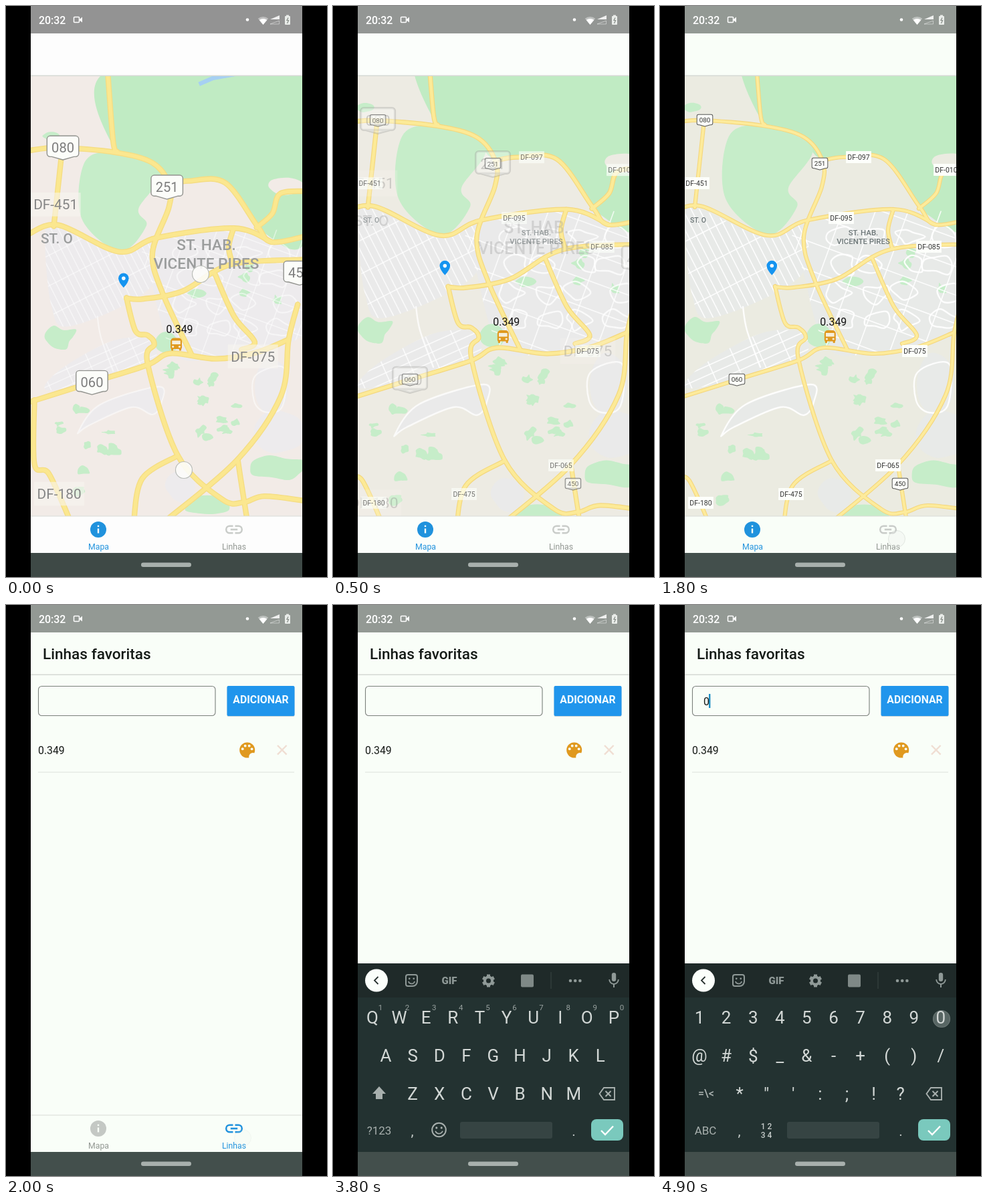
These frames come from a looping animation (480x854 px, 5000 ms). An HTML page with a canvas:

```html
<!DOCTYPE html>
<html lang="pt">
<head>
<meta charset="utf-8">
<title>Linhas</title>
<style>
html, body { margin: 0; width: 100%; height: 100%; overflow: hidden; background: #000; }
canvas { display: block; width: 480px; height: 854px; }
</style>
</head>
<body>
<canvas id="stage" width="480" height="854"></canvas>
<script>
const ctx = document.getElementById('stage').getContext('2d');
const LOOP = 5000, STEP = 100;
const FONT = 'Roboto, Arial, sans-serif';
const BLUE = '#2092dd', ORANGE = '#e0991f', PAPER = '#f9fef8', GRAY = '#a8b0ae';

const ramp = (t, a, b) => Math.min(1, Math.max(0, (t - a) / (b - a)));
const rgb = (c) => [1, 3, 5].map((i) => parseInt(c.slice(i, i + 2), 16));
function mix(a, b, k) {
  const p = rgb(a), q = rgb(b);
  return `rgb(${p.map((v, i) => Math.round(v + (q[i] - v) * k))})`;
}
let seed = 7;
function random() {
  seed = (seed * 16807) % 2147483647;
  return seed / 2147483647;
}

// Drawing helpers
function rect(x, y, w, h, color) {
  ctx.fillStyle = color;
  ctx.fillRect(x, y, w, h);
}
function paint(fill, edge, width = 1) {
  if (fill) { ctx.fillStyle = fill; ctx.fill(); }
  if (edge) { ctx.strokeStyle = edge; ctx.lineWidth = width; ctx.stroke(); }
}
function round(x, y, w, h, r, fill, edge, width) {
  ctx.beginPath();
  ctx.roundRect(x, y, w, h, r);
  paint(fill, edge, width);
}
function disc(x, y, r, fill, edge, width) {
  ctx.beginPath();
  ctx.arc(x, y, r, 0, 7);
  paint(fill, edge, width);
}
function arc(x, y, r, a, b, color, width) {
  ctx.beginPath();
  ctx.arc(x, y, r, a, b);
  paint(null, color, width);
}
function trace(pts) {
  ctx.beginPath();
  for (let i = 0; i < pts.length; i += 2) ctx.lineTo(pts[i], pts[i + 1]);
}
function line(pts, color, width) {
  trace(pts);
  paint(null, color, width);
}
function shape(pts, color) {
  trace(pts);
  paint(color);
}
function text(s, x, y, size, color, align = 'center', weight = 400) {
  ctx.font = `${weight} ${size}px ${FONT}`;
  ctx.textAlign = align;
  ctx.fillStyle = color;
  ctx.fillText(s, x, y);
}
function faded(alpha, draw) {
  if (alpha <= 0) return;
  ctx.save();
  ctx.globalAlpha *= alpha;
  draw();
  ctx.restore();
}
function touch(x, y, alpha) {
  faded(alpha, () => disc(x, y, 12.5, 'rgba(252,252,250,.9)', '#b9bcb8', 1.2));
}

// Icons
function linkIcon(x, y, color) {
  for (const side of [-1, 1]) {
    ctx.beginPath();
    ctx.moveTo(x + side * 1.5, y - 5.3);
    ctx.lineTo(x + side * 6.5, y - 5.3);
    ctx.arc(x + side * 6.5, y, 5.3, -Math.PI / 2, Math.PI / 2, side < 0);
    ctx.lineTo(x + side * 1.5, y + 5.3);
    paint(null, color, 2.5);
  }
  rect(x - 5.2, y - 1.3, 10.4, 2.6, color);
}
function pinIcon(x, tip) {
  const y = tip - 14;
  ctx.beginPath();
  ctx.arc(x, y, 7.8, Math.PI, 0);
  ctx.quadraticCurveTo(x + 7.5, y + 6, x, tip);
  ctx.quadraticCurveTo(x - 7.5, y + 6, x - 7.8, y);
  paint('#1594f0');
  disc(x, y, 2.8, '#f4fbff');
}
function busIcon(x, y) {
  round(x - 8.5, y - 9.5, 17, 16.5, [5, 5, 2, 2], ORANGE);
  rect(x - 6.3, y - 5.5, 12.6, 5.5, '#f6efdc');
  for (const side of [-1, 1]) {
    disc(x + side * 4.9, y + 3.5, 1.6, '#f6efdc');
    round(x + side * 5.9 - 1.6, y + 5, 3.2, 4.5, 1, ORANGE);
  }
}
function paletteIcon(x, y) {
  disc(x, y, 11.5, ORANGE);
  disc(x + 8.5, y + 10, 6, PAPER);
  for (const a of [-2.87, -2, -1.14, -0.27]) disc(x + 7.2 * Math.cos(a), y + 0.2 + 7.2 * Math.sin(a), 1.9, PAPER);
}
function cross(x, y, r, color, width) {
  for (const d of [-r, r]) line([x - d, y - r, x + d, y + r], color, width);
}

// Map geometry at the final zoom
function curve(pts, closed) {
  const path = new Path2D(), n = pts.length / 2;
  const at = (i) => {
    const j = closed ? (i + n) % n : Math.min(n - 1, Math.max(0, i));
    return [pts[2 * j], pts[2 * j + 1]];
  };
  path.moveTo(...at(0));
  for (let i = 0; i < (closed ? n : n - 1); i++) {
    const [a, b, c, d] = [-1, 0, 1, 2].map((k) => at(i + k));
    path.bezierCurveTo(b[0] + (c[0] - a[0]) / 6, b[1] + (c[1] - a[1]) / 6,
      c[0] - (d[0] - b[0]) / 6, c[1] - (d[1] - b[1]) / 6, ...c);
  }
  return path;
}
const road = (...pts) => curve(pts, false);
const area = (...pts) => curve(pts, true);
function blob(x, y, w, h, rough, n = 10) {
  const pts = [];
  for (let i = 0; i < n; i++) {
    const a = i / n * 2 * Math.PI, r = 1 - rough * random();
    pts.push(x + w * r * Math.cos(a), y + h * r * Math.sin(a));
  }
  return curve(pts, true);
}
function grove(x, y, spread, count) {
  return Array.from({ length: count }, () => blob(
    x + (random() - 0.5) * 2 * spread, y + (random() - 0.5) * 2 * spread,
    7 + 8 * random(), 5 + 7 * random(), 0.6));
}

const forest = area(141, 45, 155, 178, 212, 195, 243, 229, 335, 229, 400, 312, 470, 318, 470, 45);
const woods = area(103, 195, 155, 180, 228, 212, 192, 272, 205, 300, 162, 342, 98, 288);
const clearing = blob(435, 234, 32, 16, 0.2);
const center = area(205, 335, 350, 305, 470, 330, 470, 475, 320, 518, 250, 510, 215, 400);
const quarter = area(92, 642, 128, 596, 225, 566, 230, 592, 215, 612, 180, 600, 110, 630);
const towns = [center, quarter, blob(412, 565, 30, 48, 0.1), blob(262, 730, 33, 30, 0.3), blob(425, 640, 45, 40, 0.2)];
const parks = [
  blob(62, 484, 34, 22, 0.5), blob(238, 494, 20, 20, 0.2), blob(288, 412, 18, 9, 0.3),
  blob(48, 152, 16, 8, 0.3), blob(425, 700, 55, 22, 0.3), blob(305, 760, 45, 20, 0.3),
  ...grove(300, 570, 20, 4), ...grove(325, 620, 36, 9), ...grove(250, 533, 14, 3),
  ...grove(128, 655, 26, 6), ...grove(75, 620, 25, 4), ...grove(85, 722, 25, 3), ...grove(400, 400, 40, 4)
];

const roads = [
  road(141, 45, 150, 160, 157, 178),
  road(10, 176, 60, 171, 154, 179, 215, 196, 243, 232, 242, 270, 215, 345, 232, 412, 280, 514),
  road(66, 172, 52, 301),
  road(243, 231, 275, 226, 335, 229, 388, 300, 412, 327, 470, 317),
  road(387, 303, 413, 280, 426, 247, 470, 243),
  road(10, 314, 60, 299, 160, 343, 222, 320, 350, 304, 412, 327),
  road(172, 420, 200, 421, 265, 408, 345, 364, 470, 356),
  road(172, 419, 187, 474, 207, 481, 218, 496, 207, 528, 257, 680, 330, 752, 366, 757, 400, 747, 470, 755),
  road(10, 592, 115, 559, 207, 530, 245, 511, 320, 520, 385, 510, 440, 488),
  road(318, 379, 350, 450, 384, 492, 362, 505),
  road(349, 304, 341, 335, 347, 362),
  road(455, 430, 440, 488, 427, 582, 355, 687, 240, 785),
  road(356, 687, 361, 720, 372, 790),
  road(257, 680, 198, 718, 184, 790),
  road(20, 588, 20, 694, 44, 710, 78, 785)
];
const lanes = [quarter, road(124, 450, 130, 485, 150, 540), area(383, 590, 385, 548, 432, 535, 430, 598, 402, 608)];
for (let i = 0; i < 16; i++) {
  lanes.push(blob(258 + 52 * (i % 4) + 20 * random(), 345 + 42 * Math.floor(i / 4), 26, 19, 0.6, 7));
}

const blocks = [
  { clip: area(38, 312, 60, 304, 160, 347, 212, 328, 210, 404, 80, 466, 48, 432), angle: 1.1, gap: 11, across: 45 },
  { clip: area(48, 572, 60, 540, 150, 490, 213, 490, 205, 530), angle: -0.42, gap: 13, across: 38 },
  { clip: center, angle: 0.35, gap: 40, across: 46 }
];

const signs = [['DF-451', 55, 265], ['DF-075', 381, 516], ['DF-180', 61, 743]];
const lateSigns = [['DF-097', 297, 226], ['DF-010', 428, 245], ['DF-095', 271, 317],
  ['DF-085', 402, 360], ['DF-065', 341, 687], ['DF-475', 196, 730]];
const shields = [['080', 67, 171], ['251', 239, 236], ['060', 115, 559]];

function hatch({ clip, angle, gap, across }) {
  ctx.save();
  ctx.clip(clip);
  ctx.translate(120, 400);
  ctx.rotate(angle);
  for (let d = -440; d < 440; d += gap) line([-440, d, 440, d], '#fff', 1.6);
  for (let d = -440; d < 440; d += across) line([d, -440, d, 440], '#fff', 1.6);
  ctx.restore();
}
function sign([name, x, y], big) {
  const size = big ? 23 : 10.5, w = size * 3.6, h = size * 1.7;
  rect(x - w / 2, y - h / 2, w, h, big ? 'rgba(248,246,240,.6)' : '#fdfffb');
  text(name, x, y + size * 0.36, size, big ? '#858585' : '#333');
}
function shield([name, x, y], big) {
  ctx.save();
  ctx.translate(x, y);
  if (big) ctx.scale(2.25, 2.25);
  ctx.beginPath();
  ctx.roundRect(-11.3, -8.3, 22.6, 14.6, 2);
  ctx.moveTo(-8, 6.3);
  ctx.lineTo(0, 8.6);
  ctx.lineTo(8, 6.3);
  paint(null, big ? '#92938f' : '#555', big ? 1.4 : 2);
  paint('#fcfdf9');
  text(name, 0, 3.4, 9.9, big ? '#7d7d7d' : '#333');
  ctx.restore();
}
function labels(big) {
  for (const s of signs) sign(s, big);
  if (!big) for (const s of lateSigns) sign(s, false);
  for (const s of shields) shield(s, big);
  shield(big ? ['450', 458, 378] : ['450', 359, 715], big);
  const size = big ? 25 : 11.4, color = big ? '#9b9d9d' : '#6d7778';
  text('ST. O', 57, big ? 329 : 324, size * 0.92, color, 'center', 500);
  text('ST. HAB.', 304, big ? 340 : 343, size, color, 'center', 500);
  text('VICENTE PIRES', 304, big ? 371 : 356, size, color, 'center', 500);
}
function fillAll(paths, color) {
  ctx.fillStyle = color;
  for (const p of paths) ctx.fill(p);
}
function strokeAll(paths, color, width) {
  ctx.strokeStyle = color;
  ctx.lineWidth = width;
  for (const p of paths) ctx.stroke(p);
}

function drawMap(t) {
  const k = Math.exp(-t / 97), s = 1 - 0.095 * k, sharp = ramp(t, 300, 600);
  const land = mix('#f2ebe7', '#ebebe1', sharp);
  const place = (x, y) => [257 + (x - 257) * s, 601 + (y - 601) * s];

  ctx.save();
  ctx.beginPath();
  ctx.rect(37, 104, 406, 659);
  ctx.clip();
  rect(37, 104, 406, 659, land);
  ctx.save();
  ctx.translate(257, 601);
  ctx.scale(s, s);
  ctx.translate(-257, -601);

  fillAll([...towns, blocks[0].clip, blocks[1].clip], mix('#edebed', '#e8eae8', sharp));
  fillAll([forest], '#c0ebc3');
  fillAll([woods, ...parks], '#c6edc9');
  fillAll([clearing], land);
  line([292, 66, 315, 56, 360, 48], '#a6d0f2', 7);

  ctx.lineCap = ctx.lineJoin = 'round';
  faded(0.5 + 0.4 * sharp, () => {
    blocks.forEach(hatch);
    strokeAll(lanes, '#fff', 2.4);
  });
  strokeAll(roads, mix('#f5dd83', '#f4d67c', sharp), 9.2 - 3 * sharp);
  strokeAll(roads, mix('#fbe78f', '#fdeb9b', sharp), 6.2 - 2.2 * sharp);
  ctx.lineCap = 'butt';
  faded(1 - sharp, () => labels(true));
  faded(sharp, () => labels(false));
  ctx.restore();

  pinIcon(...place(167.3, 402.5));
  const [bx, by] = place(254.3, 480);
  text('0.349', bx + 5, by - 2.5, 15.9, '#111');
  busIcon(bx, by + 14.5);
  const press = 1 - ramp(t, 200, 400);
  touch(292.2 - 1.2 * k, 380.5 + 20.5 * k, press);
  touch(263.7 + 2.3 * k, 695 - k, press);
  ctx.restore();
}

function drawStatus(tone) {
  rect(37, 0, 406, 41, mix('#939393', '#939994', tone));
  text('20:32', 49, 27, 15.9, '#fff', 'left', 500);
  round(101.5, 16.5, 8, 8, 1, null, '#fff', 1.5);
  shape([110, 20, 114, 16.5, 114, 24.5, 110, 21.5], '#fff');
  disc(361, 20.5, 2.3, '#fff');
  for (const [r, color] of [[12, 'rgba(255,255,255,.4)'], [9, '#fff']]) {
    ctx.beginPath();
    ctx.moveTo(384.5, 28);
    ctx.arc(384.5, 28, r, -2.27, -0.87);
    paint(color);
  }
  shape([395, 20, 409, 14, 409, 20], 'rgba(255,255,255,.85)');
  line([395, 27, 408.5, 27, 408.5, 22, 395, 27], 'rgba(255,255,255,.45)', 1);
  round(417, 15, 8, 13, 1, '#e9ece9');
  rect(419, 13.5, 4, 2, '#e9ece9');
  line([422, 17.5, 420, 21.5, 422.5, 21.5, 420.5, 26], '#858b86', 1.2);
}
function drawBars(t, list) {
  const tone = ramp(t, 200, 800), paper = mix('#fdfdfd', PAPER, tone);
  const [mapColor, listColor] = list ? ['#919691', BLUE] : [BLUE, '#919691'];
  drawStatus(tone);
  rect(37, 41, 406, 63, paper);
  rect(37, 103.5, 406, 1.5, '#d5d9d4');
  if (list) text('Linhas favoritas', 55, 81, 22.6, '#151a17', 'left', 500);

  rect(37, 763, 406, 55, paper);
  rect(37, 762.5, 406, 1, '#d9dcd8');
  disc(138, 783, 12, list ? '#c4c8c4' : BLUE);
  rect(136.8, 781.5, 2.4, 7, paper);
  rect(136.8, 776.7, 2.4, 2.4, paper);
  linkIcon(341, 783, list ? BLUE : '#c9ccc9');
  text('Mapa', 138.5, 812.5, 12.3, mapColor);
  text('Linhas', 341, 812.5, 12.3, listColor);
}
function drawNav(t) {
  rect(37, 818, 406, 36, mix('#3e4946', '#434f4c', ramp(t, 200, 800)));
  round(202, 832.5, 75, 6.5, 3.2, '#a8b0ad');
}

function drawList(t) {
  rect(37, 105, 406, 658, PAPER);
  round(48.5, 121.5, 264.5, 44, 5, null, '#7b807c', 1.1);
  round(330.5, 122, 101, 45, 2, '#c9d5d8');
  round(330.5, 121, 101, 45, 2, '#2095ec');
  text('ADICIONAR', 381, 147, 15.8, '#f2fbff', 'center', 700);
  text('0.349', 48, 222.5, 15.8, '#161a17', 'left');
  paletteIcon(360.7, 217);
  cross(412.8, 216.8, 6.8, '#f0ded3', 2.4);
  rect(48, 249.5, 383, 1.2, '#e2e7e1');

  const typed = t >= 4800;
  const blink = t >= 2900 && (t - 2900) % 1000 < 500;
  if (typed) text('0', 65, 150, 15.8, '#161a17', 'left');
  if (typed || blink) rect(typed ? 73 : 65, 133, 2.4, 21, '#1d8fc4');
  if (t >= 2900) touch(203, 154, 1 - ramp(t, 2900, 3100));
}

const column = (i) => 59 + i * 40.1;
function keys(chars, first, y, size = 26, color = '#d3d8d6', dx = 0) {
  [...chars].forEach((c, i) => text(c, column(first + i) + dx, y, size, color));
}
function face(x, y, r, color) {
  for (const side of [-1, 1]) disc(x + side * r * 0.36, y - r * 0.3, r * 0.15, color);
  arc(x, y, r * 0.55, 0.3, 2.84, color, 1.8);
}
function drawToolbar() {
  const gray = '#8f9997', dark = '#1f2a29';
  rect(37, 536, 406, 51, dark);
  disc(65, 561.5, 17, '#fbfffb');
  line([67.5, 556, 62, 561.5, 67.5, 567], '#27312f', 1.8);
  round(109, 553, 17, 17, [3, 3, 7, 3], null, gray, 2);
  face(117.5, 561.5, 9, gray);
  text('GIF', 174, 566.5, 15, gray, 'center', 900);
  for (let a = Math.PI / 6; a < 6.5; a += Math.PI / 3) {
    line([232.5, 562, 232.5 + 9.5 * Math.cos(a), 562 + 9.5 * Math.sin(a)], gray, 5);
  }
  disc(232.5, 562, 5.5, dark, gray, 4);
  round(281, 552.5, 19, 19, 2, '#7f8987');
  rect(325.5, 549, 1, 25, '#3b4645');
  for (let i = -1; i < 2; i++) disc(362.2 + i * 7.2, 562, 2.3, gray);
  round(416.8, 550, 6.4, 13, 3.2, gray);
  arc(420, 560, 6.8, 0, Math.PI, gray, 1.8);
  line([420, 567, 420, 572], gray, 2);
}
function drawLetters() {
  keys('QWERTYUIOP', 0, 626);
  keys('1234567890', 0, 606, 11.5, '#98a19f', 12);
  keys('ASDFGHJKL', 0.5, 683);
  keys('ZXCVBNM', 1.5, 740);
  shape([69, 720, 79, 731, 59, 731], GRAY);
  rect(64, 730, 10, 9, GRAY);
  text('?123', 69, 791.5, 17, GRAY);
  disc(158.5, 785, 10.3, null, GRAY, 2);
  face(158.5, 785, 10.3, GRAY);
}
function drawSymbols() {
  keys('1234567890', 0, 626);
  keys('@#$_&-+()/', 0, 683);
  keys('*"\':;!?', 1.5, 740);
  text('=\\<', 69, 736, 16, GRAY, 'center', 500);
  text('ABC', 68, 791.5, 17, GRAY);
  text('1 2', 159, 783.5, 12, '#c5cbc9', 'center', 500);
  text('3 4', 159, 796.5, 12, '#c5cbc9', 'center', 500);
}
function drawKeyboard(t) {
  ctx.save();
  ctx.beginPath();
  ctx.rect(37, 105, 406, 713);
  ctx.clip();
  ctx.translate(0, 282 * (1 - ramp(t, 2900, 3300)) ** 2);
  rect(37, 536, 406, 282, '#233231');
  drawToolbar();
  if (t >= 4700) disc(421, 619, 12.5, '#586664', '#6a7674', 1.2);
  if (t >= 4200) drawSymbols();
  else drawLetters();
  text(',', 118.5, 794, 21, '#c5cbc9');
  text('.', 360, 794, 21, '#c5cbc9');
  line([405, 722, 421, 722, 421, 740, 405, 740, 398.5, 731, 405, 722, 408, 722], GRAY, 1.9);
  cross(411.5, 731, 4, GRAY, 1.9);
  round(190, 773, 138, 25, 3, '#364443');
  round(386, 769, 48, 32, 8, '#7ac9bd');
  line([401, 786, 407, 792, 419, 779.5], '#fff', 2.4);
  if (t >= 4100) faded(0.3 * (1 - ramp(t, 4200, 4400)), () => disc(68, 785, 12.5, '#d5dbd9', '#fff'));
  ctx.restore();
}

function draw(t) {
  const list = t >= 1900;
  rect(0, 0, 480, 854, '#000');
  if (list) drawList(t);
  else drawMap(t);
  drawBars(t, list);
  if (t >= 1800) {
    faded(1 - ramp(t, 1800, 2100), () => disc(354, 797, 12.5, 'rgba(235,240,234,.3)', 'rgba(150,155,150,.22)'));
  }
  if (t >= 3000) drawKeyboard(t);
  drawNav(t);
}

const start = performance.now();
function tick() {
  const t = (performance.now() - start) % LOOP;
  draw(Math.floor(t / STEP) * STEP);
  requestAnimationFrame(tick);
}
tick();
</script>
</body>
</html>
```
